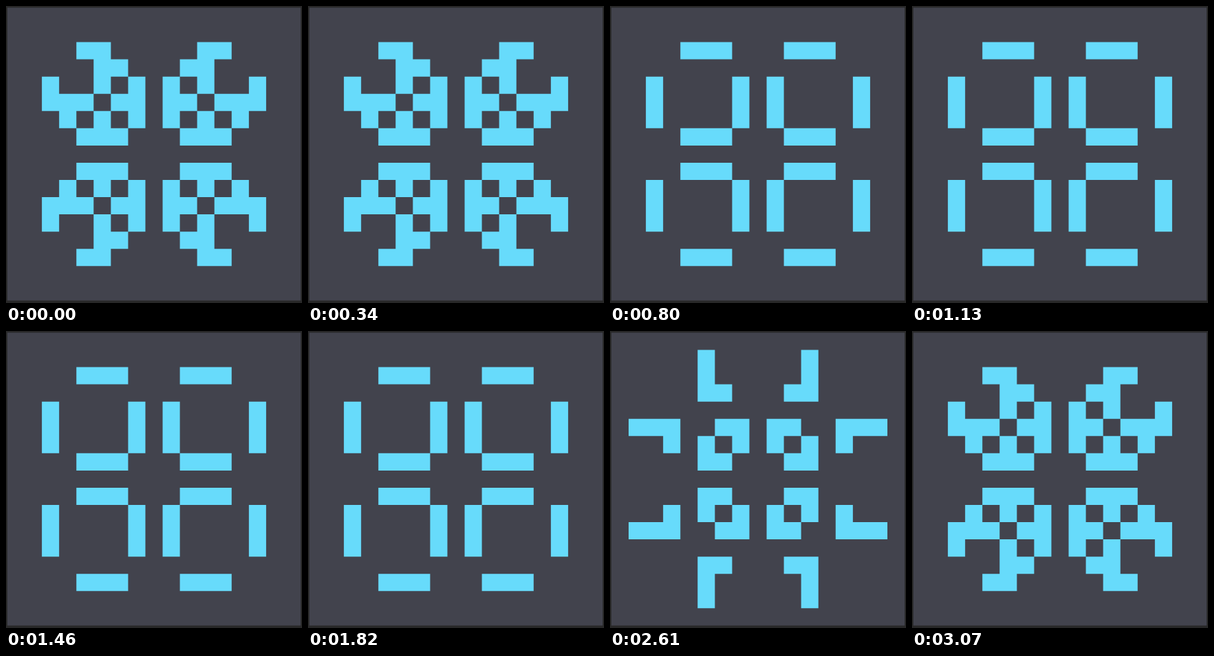
An HTML page with a canvas that plays this animation: 430x432 px, repeating every 3.12 s.

```html
<!DOCTYPE html>
<html lang="en">
<head>
<meta charset="utf-8">
<title>Game of Life pulsar</title>
<style>
  html, body { margin: 0; width: 100%; height: 100%; overflow: hidden; background: #282828; }
  canvas { display: block; }
</style>
</head>
<body>
<canvas id="board" width="430" height="432"></canvas>
<script>
const SIZE = 17, CELL = 25.06, LEFT = 2, TOP = 2.4;
const LOOP = 3120, STEPS = 27;
const ctx = document.getElementById('board').getContext('2d');

const makeGrid = rule => Array.from({ length: SIZE }, (_, y) =>
  Array.from({ length: SIZE }, (_, x) => rule(x, y)));

// Pulsar seed: bars of three on four lines, mirrored across the diagonal
const onBar = v => (v >= 4 && v <= 6) || (v >= 10 && v <= 12);
const onLine = v => [2, 7, 9, 14].includes(v);
const seed = makeGrid((x, y) => (onBar(x) && onLine(y)) || (onBar(y) && onLine(x)));

function neighbours(grid, x, y) {
  let count = 0;
  for (let dy = -1; dy <= 1; dy++)
    for (let dx = -1; dx <= 1; dx++)
      if ((dx || dy) && grid[y + dy]?.[x + dx]) count++;
  return count;
}

const evolve = grid => makeGrid((x, y) => {
  const n = neighbours(grid, x, y);
  return n === 3 || (n === 2 && grid[y][x]);
});

const second = evolve(seed);
const generations = [seed, second, evolve(second)];

// Generations last 100 or 130 ms, spread evenly
const stepTime = k => 110 + 100 * k + 30 * Math.floor((9 * k + 2) / 19);

function stepsAt(time) {
  let n = 0;
  while (n < STEPS && time >= stepTime(n)) n++;
  return n;
}

function draw(grid) {
  ctx.fillStyle = '#282828';
  ctx.fillRect(0, 0, 430, 432);
  ctx.fillStyle = '#42434d';
  ctx.fillRect(LEFT, TOP, SIZE * CELL, SIZE * CELL);
  ctx.fillStyle = '#67dbfb';
  ctx.beginPath();
  grid.forEach((row, y) => row.forEach((alive, x) => {
    if (alive) ctx.rect(LEFT + x * CELL, TOP + y * CELL, CELL, CELL);
  }));
  ctx.fill();
}

function tick() {
  const steps = stepsAt(performance.now() % LOOP);
  draw(generations[(steps + 2) % 3]);
  requestAnimationFrame(tick);
}
tick();
</script>
</body>
</html>
```
